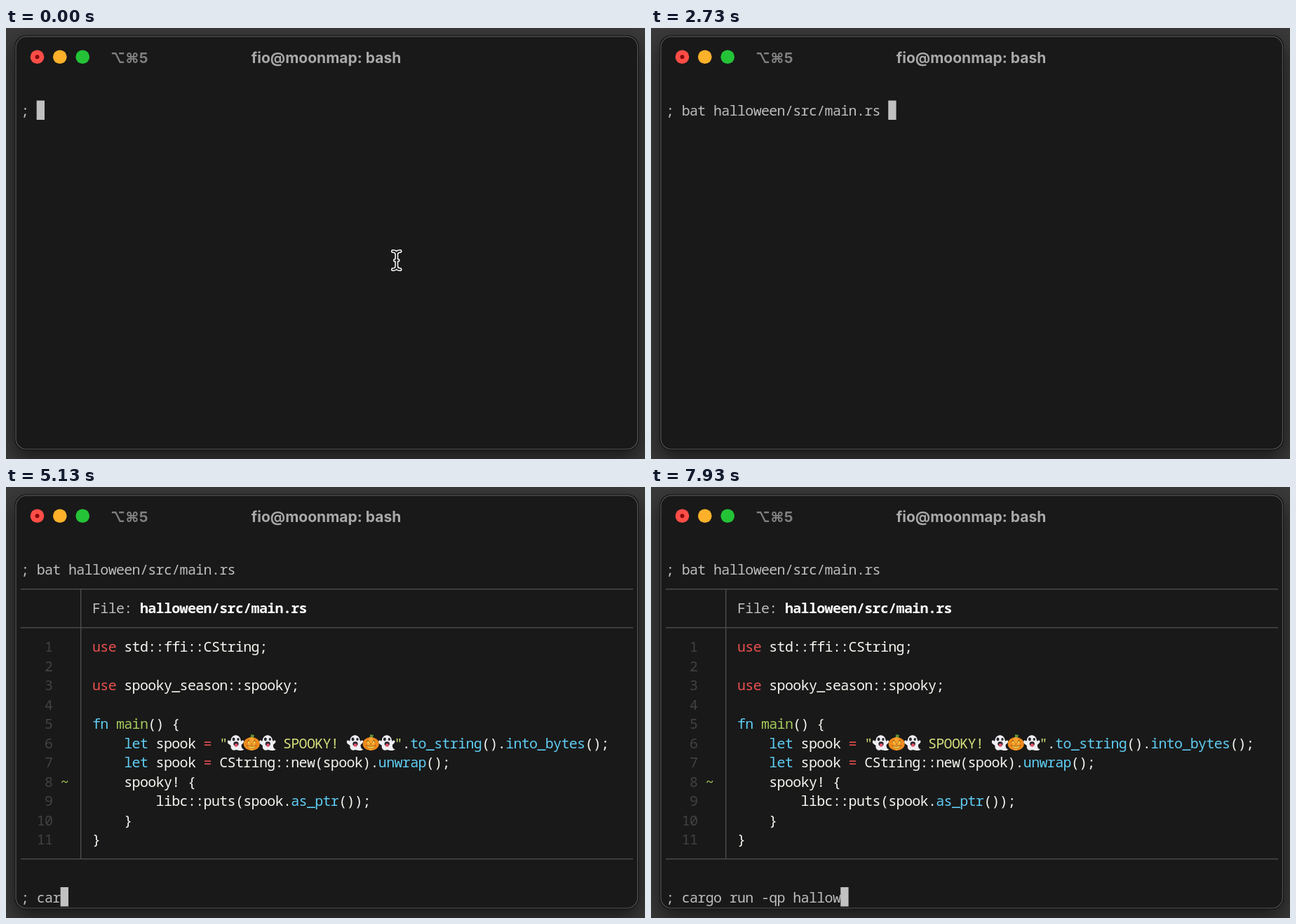
Write an HTML page with a canvas that moves like this. It is 911 px wide and 615 px high and loops after 8 s.

```html
<!DOCTYPE html>
<html lang="en">
<head>
<meta charset="utf-8">
<title>Terminal</title>
<style>
  html, body { margin: 0; width: 100%; height: 100%; overflow: hidden; background: #333; }
  canvas { display: block; }
</style>
</head>
<body>
<canvas id="stage" width="911" height="615"></canvas>
<script>
const ctx = document.getElementById('stage').getContext('2d');
const LOOP = 8000, CELL = 11.33, LINE = 27.5, LEFT = 21, TOP = 103.5;
const ENTER = 3530, OUTPUT = 3670, POINTER_HIDES = 470;

const INK = '#bdbdbd', WHITE = '#f5f5f0', RED = '#e8504f', CYAN = '#5fcdf3',
      GREEN = '#a5c95a', STRING = '#d6df7c', RULE = '#4c4c4c', DIM = '#424242';

// Each key press: [time, characters visible]; completions jump ahead.
const first = {
  text: 'bat halloween/src/main.rs ',
  keys: [[470, 1], [600, 2], [670, 3], [800, 4],
         [1400, 5], [1500, 6], [1600, 7], [1700, 8], [1800, 9], [1900, 10], [2000, 14],
         [2200, 15], [2300, 16], [2400, 18], [2730, 26]]
};
const second = {
  text: 'cargo run -qp hallow',
  keys: [4870, 5000, 5130, 5270, 5330, 5400, 5530, 5600, 5730, 5870, 6130, 6270,
         6400, 6530, 6670, 6730, 6870, 7070, 7200, 7870].map((time, i) => [time, i + 1])
};

// Source lines as colour/text runs, starting at the code column.
const code = [
  [RED, 'use', WHITE, ' std::ffi::CString;'],
  [],
  [RED, 'use', WHITE, ' spooky_season::spooky;'],
  [],
  [CYAN, 'fn ', GREEN, 'main', WHITE, '() {'],
  [CYAN, '    let', WHITE, ' spook ', RED, '= ', STRING, '"       SPOOKY!       "',
   WHITE, '.', CYAN, 'to_string', WHITE, '().', CYAN, 'into_bytes', WHITE, '();'],
  [CYAN, '    let', WHITE, ' spook ', RED, '= ', WHITE, 'CString::new(spook).',
   CYAN, 'unwrap', WHITE, '();'],
  [WHITE, '    spooky! {'],
  [WHITE, '        libc::puts(spook.', CYAN, 'as_ptr', WHITE, '());'],
  [WHITE, '    }'],
  [WHITE, '}']
];

const colX = col => LEFT + col * CELL;
const rowY = row => TOP + row * LINE;

function write(row, col, color, text, weight = 400) {
  ctx.font = `${weight} 20px "Noto Sans Mono", monospace`;
  ctx.letterSpacing = CELL - 12 + 'px';
  ctx.fillStyle = color;
  ctx.fillText(text, colX(col), rowY(row) + 21.5);
  ctx.letterSpacing = '0px';
}

function disc(x, y, rx, color, ry = rx) {
  ctx.fillStyle = color;
  ctx.beginPath();
  ctx.ellipse(x, y, rx, ry, 0, 0, Math.PI * 2);
  ctx.fill();
}

function shape(path, color) {
  ctx.fillStyle = color;
  ctx.fill(new Path2D(path));
}

function ghost() {
  shape('M-7-4C-6-13 6-13 7-4L8-2C10-5 13-3 11 0L8 3C8 8 10 9 12 9C8 13 3 10 0 10C-4 12-8 9-7 4L-11 1C-13-3-10-5-8-2Z', '#efeff3');
  disc(-3, -5, 2, '#26262b', 2.4);
  disc(3.4, -5, 1.7, '#26262b', 2);
  disc(0.4, 1.5, 3.6, '#26262b', 3.2);
  disc(0.6, 3.4, 2.4, '#e8506a', 2.4);
}

function pumpkin() {
  shape('M-2-6L-1-12L4-11L2-6Z', '#5c9138');
  disc(0, 1.5, 11.5, '#ef8a1d', 9.5);
  disc(0, 1.5, 5, '#f9a22d', 9.5);
  shape('M-6.5 0L-4-4.5L-1.5 0ZM6.5 0L4-4.5L1.5 0ZM-1 2.5L0 .5L1 2.5ZM-7.5 3Q0 6 7.5 3Q5 8 0 8Q-5 8-7.5 3Z', '#8a430c');
  shape('M-6 .3L-4-3L-2 .3ZM6 .3L4-3L2 .3ZM-6.5 4Q0 7 6.5 4Q4 7.5 0 7.5Q-4 7.5-6.5 4Z', '#ffe352');
}

function emoji(draw, col) {
  ctx.save();
  ctx.translate(colX(col) + 12, rowY(9) + 14);
  draw();
  ctx.restore();
}

function drawWindow() {
  ctx.fillStyle = '#3a3a3a';
  ctx.fillRect(0, 0, 911, 615);
  ctx.save();
  ctx.shadowColor = 'rgba(0,0,0,.6)';
  ctx.shadowBlur = 30;
  ctx.shadowOffsetY = 12;
  ctx.fillStyle = '#0c0c0c';
  ctx.beginPath();
  ctx.roundRect(12.5, 10.5, 889.5, 592, 16);
  ctx.fill();
  ctx.restore();
  ctx.fillStyle = '#191919';
  ctx.strokeStyle = '#585858';
  ctx.lineWidth = 1.2;
  ctx.beginPath();
  ctx.roundRect(14, 12.2, 886.5, 588.8, 15);
  ctx.fill();
  ctx.stroke();

  disc(44.5, 41.3, 9.8, '#fd4d47');
  disc(44.5, 41.3, 3, '#850b0a');
  disc(76.8, 41.3, 9.8, '#fdb12a');
  disc(109.2, 41.3, 9.8, '#24c337');
  ctx.font = '700 20.5px Inter, "DejaVu Sans", sans-serif';
  ctx.fillStyle = '#808080';
  ctx.fillText('⌥⌘5', 149, 49.5);
  ctx.font = '700 21px Inter, sans-serif';
  ctx.fillStyle = '#a9a9a9';
  ctx.textAlign = 'center';
  ctx.fillText('fio@moonmap: bash', 456.5, 49.5);
  ctx.textAlign = 'left';
}

function drawListing() {
  ctx.fillStyle = RULE;
  for (const y of [145, 200, 530]) ctx.fillRect(LEFT, y, 873, 1.4);
  ctx.fillRect(106, 146, 1.4, 385);
  write(2, 9, INK, 'File: ');
  write(2, 15, '#fff', 'halloween/src/main.rs', 700);
  code.forEach((runs, i) => {
    write(i + 4, 2, DIM, String(i + 1).padStart(2));
    for (let k = 0, col = 9; k < runs.length; k += 2) {
      write(i + 4, col, runs[k], runs[k + 1]);
      col += runs[k + 1].length;
    }
  });
  write(11, 5, GREEN, '~');
  [26, 41].forEach(col => [ghost, pumpkin, ghost].forEach((draw, i) => emoji(draw, col + 2 * i)));
}

function drawPrompt(row, command, t) {
  const last = command.keys.filter(([time]) => time <= t).pop();
  const text = '; ' + command.text.slice(0, last ? last[1] : 0);
  write(row, 0, INK, text);
  return text.length;
}

function drawCaret(row, col) {
  ctx.fillStyle = '#c1c1c1';
  ctx.fillRect(colX(col), rowY(row), CELL, LINE);
}

function drawPointer() {
  const beam = new Path2D('M551.5 318.5Q556.8 318.5 556.8 323V340Q556.8 344.5 551.5 344.5M562 318.5Q556.8 318.5 556.8 323M556.8 340Q556.8 344.5 562 344.5M554.5 331.5H559');
  ctx.lineCap = 'round';
  for (const [color, width] of [['#fff', 5], ['#191919', 2]]) {
    ctx.strokeStyle = color;
    ctx.lineWidth = width;
    ctx.stroke(beam);
  }
}

function frame(now) {
  const t = now % LOOP;
  drawWindow();
  const col = drawPrompt(0, first, t);
  if (t < ENTER) drawCaret(0, col);
  else if (t < OUTPUT) drawCaret(1, 0);
  else {
    drawListing();
    drawCaret(17, drawPrompt(17, second, t));
  }
  if (t < POINTER_HIDES) drawPointer();
  requestAnimationFrame(frame);
}
requestAnimationFrame(frame);
</script>
</body>
</html>
```
